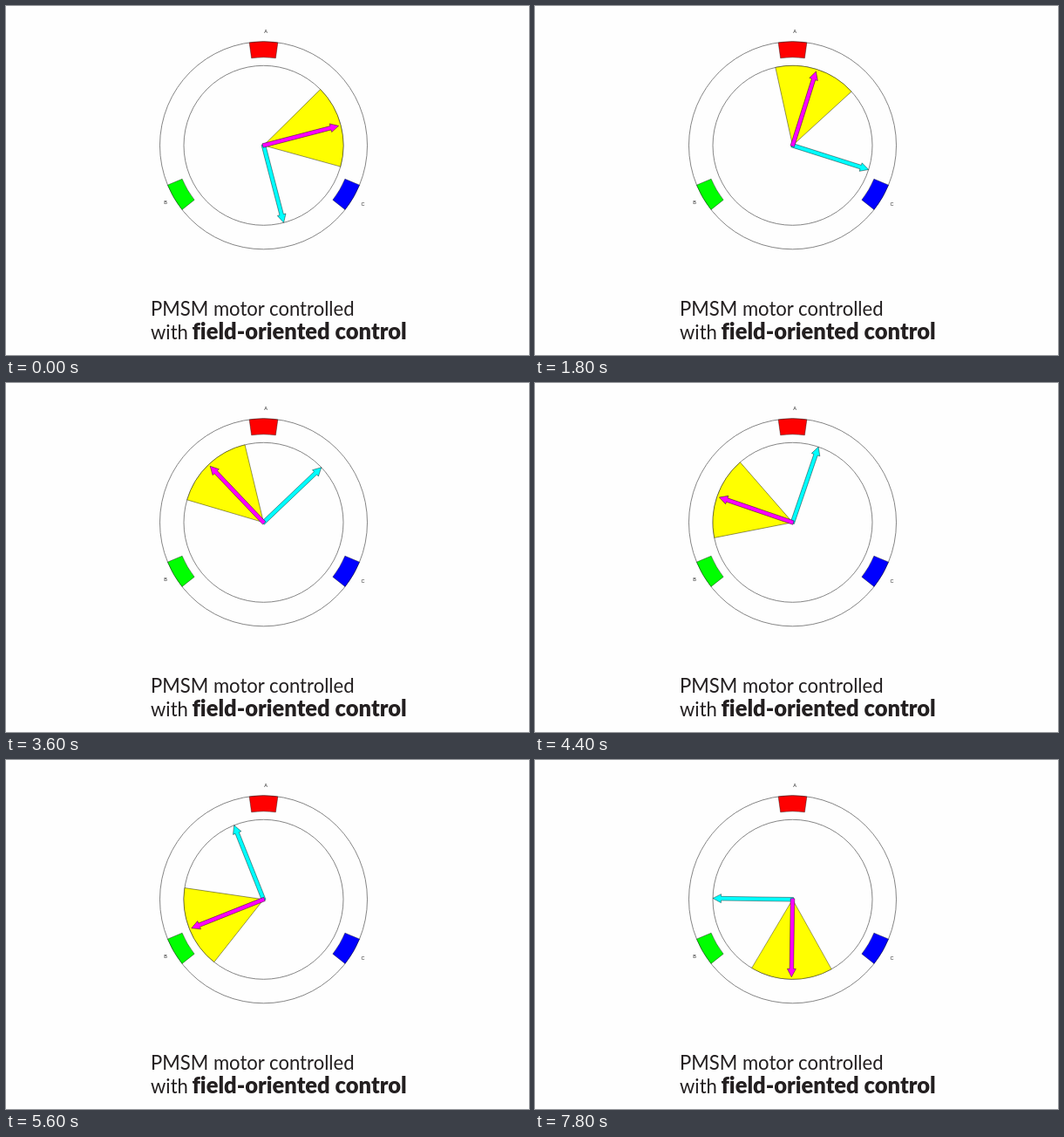
Animation of 600x400 px, one loop 8 s. Source, as an HTML page:

```html
<!DOCTYPE html>
<html lang="en">
<head>
<meta charset="utf-8">
<title>Field-oriented control</title>
<style>
  html, body { margin: 0; width: 100%; height: 100%; overflow: hidden; background: #fefefe; }
  svg { display: block; width: 100%; height: 100%; }
  .line { stroke: #000; stroke-opacity: .65; stroke-width: .6; stroke-linejoin: round; }
  .ring { fill: none; stroke: #666; stroke-width: .8; }
  .label { font: 5.5px "Liberation Sans", Arial, sans-serif; fill: #222; text-anchor: middle; }
  .caption { font: 22.1px Lato, sans-serif; fill: #231f20; font-variant-ligatures: none; }
  .strong { font-size: 25.5px; font-weight: 900; }
</style>
</head>
<body>
<svg viewBox="0 0 600 400">
  <g transform="translate(295.5 159.8)">
    <circle class="ring" r="119"/>
    <circle class="ring" r="91.5"/>
    <g id="coils"></g>
    <g id="rotor">
      <path id="wedge" class="line" fill="#ff0"/>
      <path id="flux" class="line" fill="#0ff" transform="rotate(90)"/>
      <path id="torque" class="line" fill="#f0f"/>
    </g>
  </g>
  <text class="label" x="298" y="31">A</text>
  <text class="label" x="183" y="227">B</text>
  <text class="label" x="409.5" y="229">C</text>
  <text class="caption" x="166" y="355">PMSM motor controlled</text>
  <text class="caption" x="166" y="382">with</text>
  <text class="caption strong" x="213.5" y="382">field-oriented control</text>
</svg>
<script>
const LOOP = 8000, STEP = 200;
// [time in ms, counterclockwise rotor angle in degrees]
const KEYS = [[0, 14.6], [1800, 72.4], [2800, 106], [4400, 161.1],
              [5600, 201.7], [6800, 237.8], [7800, 269.2]];

const byId = id => document.getElementById(id);

function polar(radius, degrees) {
  const a = degrees * Math.PI / 180;
  return `${radius * Math.cos(a)} ${-radius * Math.sin(a)}`;
}

function sector(inner, outer, middle, half) {
  const from = middle - half, to = middle + half;
  return `M${polar(inner, from)}L${polar(outer, from)}` +
    `A${outer} ${outer} 0 0 0 ${polar(outer, to)}L${polar(inner, to)}` +
    (inner ? `A${inner} ${inner} 0 0 1 ${polar(inner, from)}` : '') + 'Z';
}

function arrow(length) {
  const neck = length - 9.5;
  return `M-1-2.3H${neck}V-5L${length} 0L${neck} 5V2.3H-1Z`;
}

function angleAt(time) {
  const next = Math.max(1, KEYS.findIndex(([t]) => t >= time));
  const [t0, a0] = KEYS[next - 1], [t1, a1] = KEYS[next];
  return a0 + (a1 - a0) * (time - t0) / (t1 - t0);
}

byId('coils').innerHTML = [['#f00', 90], ['#0f0', 210.3], ['#00f', 329.7]]
  .map(([color, angle]) => `<path class="line" fill="${color}" d="${sector(101, 119, angle, 7.9)}"/>`)
  .join('');
byId('wedge').setAttribute('d', sector(0, 91.5, 0, 30));
byId('flux').setAttribute('d', arrow(91.5));
byId('torque').setAttribute('d', arrow(89));

const start = performance.now();
function draw() {
  const elapsed = (performance.now() - start) % LOOP;
  const time = Math.floor(elapsed / STEP) * STEP;
  byId('rotor').setAttribute('transform', `rotate(${-angleAt(time)})`);
  requestAnimationFrame(draw);
}
draw();
</script>
</body>
</html>
```
